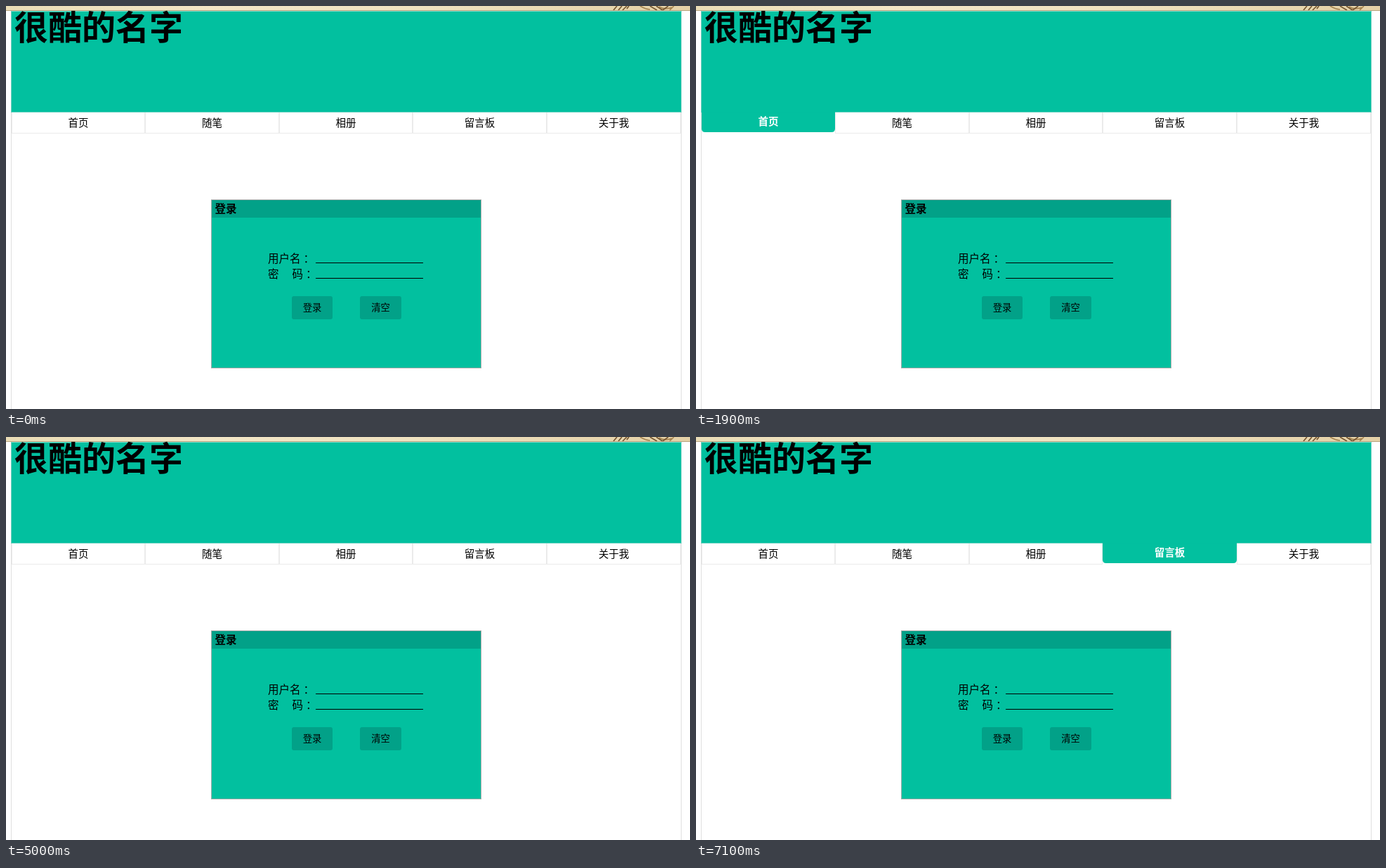
An HTML page that plays this animation: 974 by 575 pixels, repeating every 8 s.

```html
<!DOCTYPE html>
<html lang="zh-CN">
<head>
<meta charset="utf-8">
<title>登录</title>
<style>
html, body { margin: 0; width: 100%; height: 100%; overflow: hidden; background: #fff; }
svg { display: block; width: 974px; height: 575px; }
text { font-family: "Noto Sans CJK SC", "Noto Sans CJK", "Noto Sans CJK JP", sans-serif; fill: #000; }
.bold { font-weight: 700; }
.mid { text-anchor: middle; }
</style>
</head>
<body>
<svg id="stage" viewBox="0 0 974 575" lang="zh-CN">
  <defs>
    <linearGradient id="paper">
      <stop offset="0" stop-color="#eadcb6"/>
      <stop offset=".3" stop-color="#f3e6c6"/>
      <stop offset=".6" stop-color="#f0e2c0"/>
      <stop offset="1" stop-color="#e4d0a6"/>
    </linearGradient>
  </defs>
  <rect width="974" height="575" fill="#fff"/>

  <!-- parchment strip -->
  <rect width="974" height="6" fill="url(#paper)"/>
  <g fill="none" stroke="#75552f" stroke-width="1.6">
    <path d="M865 6l5-6M872 6l5-6M878 6l6-6M884 4l3-4"/>
    <path d="M903 0q6 4 14 5M930 1q8 5 18 1M951 0l-6 6" stroke="#a5834f"/>
    <path d="M917 0l10 6M926 0l9 6M943 0l-8 6"/>
  </g>
  <rect y="6" width="974" height="1" fill="#b8a580"/>

  <!-- page -->
  <path d="M7.5 7V575M961.5 7V575" stroke="#dfdfdf"/>
  <g id="nav"></g>
  <rect x="8" y="8" width="953" height="143" fill="#02c09f"/>
  <rect x="7.5" y="7.5" width="954" height="144" fill="none" stroke="#02c09f" stroke-opacity=".5"/>
  <text class="bold" x="12" y="48" font-size="48">很酷的名字</text>

  <!-- login dialog -->
  <rect x="292.5" y="276.5" width="384" height="240" fill="#02c09f" stroke="#a3aaa8"/>
  <rect x="293" y="277" width="383" height="25" fill="#02a188"/>
  <text class="bold" x="297.5" y="295" font-size="15.5">登录</text>
  <g font-size="15.5">
    <text x="373" y="365.5">用户名</text>
    <text x="423.5" y="365.5">：</text>
    <text x="373" y="387.5">密</text>
    <text x="407.5" y="387.5">码</text>
    <text x="427" y="387.5">：</text>
  </g>
  <path d="M441 366.5H594M441 388.5H594" stroke="#000"/>
  <g font-size="13.33">
    <rect x="407" y="414" width="58" height="33" rx="3" fill="#02a188"/>
    <text class="mid" x="436" y="435">登录</text>
    <rect x="504" y="414" width="59" height="33" rx="3" fill="#02a188"/>
    <text class="mid" x="533.5" y="435">清空</text>
  </g>
</svg>
<script>
const LOOP = 8000;
const NONE = -1;
const labels = ["首页", "随笔", "相册", "留言板", "关于我"];
const edges = [8, 198, 389, 579, 770, 961];

// [start ms, hovered tab]
const hovers = [
  [0, NONE], [500, 2], [900, 1], [1000, NONE], [1700, 1], [1900, 0], [2700, 1],
  [3200, 0], [5000, NONE], [5600, 3], [5700, 2], [6800, NONE], [7100, 3]
];

const nav = document.getElementById("nav");

function add(parent, tag, attrs) {
  const el = document.createElementNS("http://www.w3.org/2000/svg", tag);
  for (const key in attrs) el.setAttribute(key, attrs[key]);
  return parent.appendChild(el);
}

const tabs = labels.map((label, i) => {
  const x = edges[i], w = edges[i + 1] - x;
  const plain = add(nav, "g", {});
  const hot = add(nav, "g", {});
  add(plain, "rect", { x: x + .5, y: 151.5, width: w - 1, height: 30, fill: "#fff", stroke: "#ebebeb" });
  add(hot, "path", { d: `M${x} 151h${w}v24q0 5-5 5h${10 - w}q-5 0-5-5z`, fill: "#02c09f" });
  const attrs = { x: x + w / 2, "font-size": 14.5 };
  add(plain, "text", { ...attrs, class: "mid", y: 171.5 }).textContent = label;
  add(hot, "text", { ...attrs, class: "mid bold", y: 169.5, style: "fill:#fff" }).textContent = label;
  return { plain, hot };
});

function render(ms) {
  const active = hovers.filter(([start]) => start <= ms).pop()[1];
  tabs.forEach(({ plain, hot }, i) => {
    plain.setAttribute("visibility", i === active ? "hidden" : "visible");
    hot.setAttribute("visibility", i === active ? "visible" : "hidden");
  });
}

const begin = performance.now();
function tick() {
  render((performance.now() - begin) % LOOP);
  requestAnimationFrame(tick);
}
render(0);
requestAnimationFrame(tick);
</script>
</body>
</html>
```
